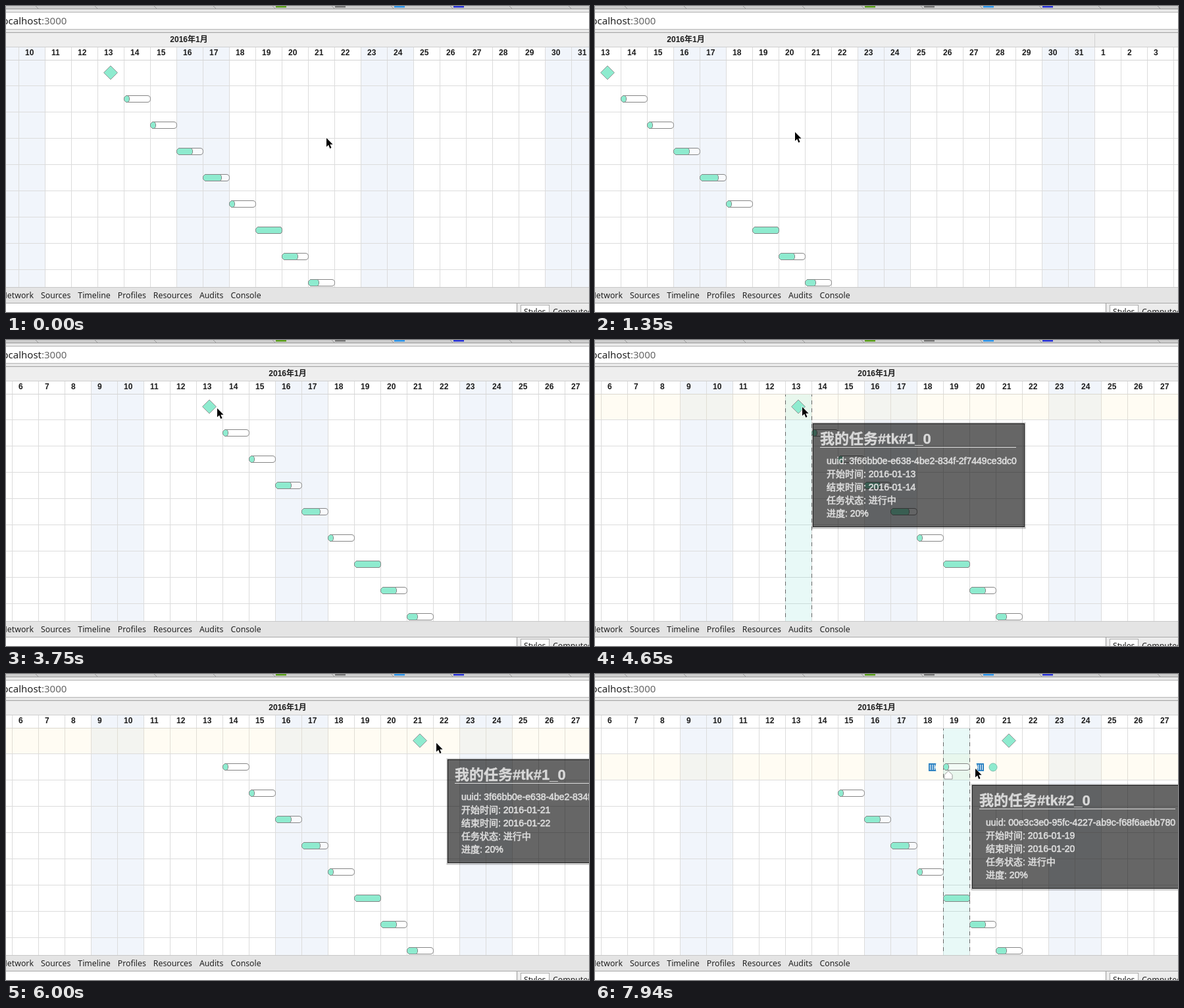
Recreate the animation shown at these times as an HTML page. Size 886 by 466 pixels, loop 8 s.

```html
<!DOCTYPE html>
<html lang="zh">
<head>
<meta charset="utf-8">
<title>Gantt chart</title>
<style>
  html, body { margin: 0; width: 100%; height: 100%; overflow: hidden; background: #fff; }
  svg { display: block; width: 886px; height: 466px; }
  text { font-family: "Liberation Sans", "Noto Sans CJK SC", "Noto Sans CJK JP", "Noto Sans CJK", sans-serif; white-space: pre; }
  .ui { font-family: "Noto Sans", "Open Sans", sans-serif; font-size: 12.3px; fill: #222; }
  .url { font-size: 15px; }
  .port { fill: #666; }
  .head { font-size: 12px; font-weight: bold; fill: #1c1c1c; }
  .tip { font-size: 14px; fill: #ddd; stroke: #ddd; stroke-width: .6px; }
  .title { font-size: 22px; font-weight: bold; fill: #d8d8d8; stroke: #d8d8d8; stroke-width: .4px; }
</style>
</head>
<body>
<svg viewBox="0 0 886 466">
  <g id="chart"></g>
  <g id="chrome"></g>
  <g id="overlay"></g>
</svg>
<script>
const LOOP = 8000, DAY = 40, LAG = 60;
const MINT = '#8eebcf', LINE = '#dcdcdc', EDGE = '#858585';
const PROGRESS = [.2, .2, .6, .7, .2, 1, .6, .4];

// Turning points of the mouse: time, x, y. Everything that is dragged follows it.
const MOUSE = [
  [0, 486, 200], [150, 454, 198],
  [680, 614, 195], [1390, 300, 191], [2090, 696, 187], [2190, 654, 187], [2400, 654, 188], [2700, 602, 188],
  [2850, 602, 188], [3840, 313, 101],
  [4640, 313, 101], [5010, 653, 100], [5190, 653, 104],
  [6000, 653, 104], [6740, 352, 143],
  [7340, 352, 143], [8080, 600, 143]];

function mouse(t) {
  const i = MOUSE.findIndex(k => k[0] > t);
  const [t0, x0, y0] = MOUSE[i - 1], [t1, x1, y1] = MOUSE[i];
  const u = (t - t0) / (t1 - t0), ease = u * u * (3 - 2 * u);
  return { x: Math.round(x0 + (x1 - x0) * ease), y: Math.round(y0 + (y1 - y0) * ease) };
}

// Mouse position as a drag lasting from start to end sees it, a little late
const dragged = (t, start, end) => mouse(Math.min(Math.max(t - LAG, start), end));

const rect = (x, y, w, h, fill, extra = '') => `<rect x="${x}" y="${y}" width="${w}" height="${h}" fill="${fill}" ${extra}/>`;
const path = (d, fill, stroke = 'none', extra = '') => `<path d="${d}" fill="${fill}" stroke="${stroke}" ${extra}/>`;
const text = (x, y, s, cls, extra = '') => `<text x="${x}" y="${y}" class="${cls}" ${extra}>${s}</text>`;
const at = (x, y, s) => `<g transform="translate(${x} ${y})">${s}</g>`;

function bar(x, y, progress) {
  const w = DAY * progress;
  return at(x + .5, y - 4.5,
    path('M3 0H35.5Q40 0 40 5T35.5 10H3L0 7V3Z', 'rgba(255,255,255,.45)', EDGE) +
    path(`M3 0H${w - 2}L${w} 3V7L${w - 2} 10H3L0 7V3Z`, MINT, EDGE));
}

function handles(x, y) {
  const grip = path('M0 0H11.5L9.5 6 11.5 12H0Z', '#2f83c2') + path('M2.5 2V10M5.5 2V10M8.5 2V10', 'none', '#fff');
  return at(x - 22, y - 5, grip) +
    at(x + 62, y - 5, `<g transform="scale(-1 1)">${grip}</g>`) +
    `<circle cx="${x + 76}" cy="${y + 1}" r="6" fill="${MINT}" stroke="#7bbfae"/>` +
    path(`M${x + 8} ${y + 6.5}l6 6v6.5h-12v-6.5Z`, '#fff', '#999');
}

function dayBand(x) {
  return rect(x, 83, DAY, 345, '#7edcd0', 'fill-opacity=".18"') +
    path(`M${x + .5} 83V428M${x + DAY + .5} 83V428`, 'none', '#666', 'stroke-dasharray="6" stroke-dashoffset="3"');
}

function tooltip(x, y, task, uuid, day) {
  const rows = [`uuid: ${uuid}`, `开始时间: 2016-01-${day}`, `结束时间: 2016-01-${day + 1}`, '任务状态: 进行中', '进度: 20%'];
  return at(x, y,
    rect(-.5, -.5, 323, 160, 'none', 'stroke="#000" stroke-opacity=".25" stroke-width="2"') +
    rect(.5, .5, 321, 157, 'rgba(0,0,0,.6)', 'stroke="#1c1c1c"') +
    text(11, 31, `我的任务#tk#${task}_0`, 'title') +
    rect(11, 36, 298, 1, '#ddd') +
    rows.map((s, i) => text(21, 62 + 20 * i, s, 'tip')).join(''));
}

// x0 is the left edge of 14 January
function chart(x0, milestoneDay, barDay, activeRow, bandDay, selected) {
  const column = day => x0 + (day - 14) * DAY;
  let s = rect(0, 41, 886, 21, '#eee') + rect(0, 62, 886, 367, '#fff');
  for (let d = 1; d < 40; d++) {
    const weekend = d % 7 === 2 || d % 7 === 3;
    s += rect(column(d), 63, DAY, 366, weekend ? '#f1f5fb' : '#fff') +
      rect(column(d), 63, 1, 366, LINE) +
      text(column(d) + 10, 75, d > 31 ? d - 31 : d, 'head');
  }
  s += rect(column(32), 42, 1, 20, '#d0d0d0') +
    text(x0 + 99, 55, '2016年1月', 'head', 'text-anchor="middle"') +
    rect(0, 62, 886, 1, '#cfcfcf') + rect(0, 82, 886, 1, '#d4d4d4');
  for (let y = 121; y < 428; y += DAY) s += rect(0, y, 886, 1, LINE);
  if (activeRow >= 0) s += rect(0, 82 + activeRow * DAY, 886, 39, 'rgba(255,235,175,.15)');
  if (bandDay) s += dayBand(column(bandDay));
  s += path(`M${column(milestoneDay) + 20} 91l10.5 10.5-10.5 10.5-10.5-10.5Z`, MINT, '#969696');
  PROGRESS.forEach((p, i) => s += bar(column(i ? 14 + i : barDay), 141 + i * DAY, p));
  if (selected) s += handles(column(barDay), 141);
  return s;
}

function browser() {
  const icons = ['#5c9f1c', '#777', '#2f96ea', '#2b35d8'];
  const tabs = ['Sources', 'Timeline', 'Profiles', 'Resources', 'Audits', 'Console'];
  let s = rect(0, 0, 886, 4, '#cdcdcd') + rect(0, 4, 886, 1, '#9b9b9b') + rect(0, 5, 886, 36, '#e9e9e9');
  for (let x = 45; x < 886; x += 90) s += path(`M${x} 0l4 4`, 'none', '#999');
  icons.forEach((color, i) => s += rect(410 + i * 90, 0, 16, 2.5, color));
  s += rect(0, 9, 886, 27, '#b5b5b5') + rect(0, 10, 886, 25, '#fff') + rect(0, 40, 886, 1, '#a2a2a2') +
    text(54, 28, 'localhost', 'ui url', 'text-anchor="end"') +
    text(54, 28, ':3000', 'ui url port');

  s += rect(0, 428, 886, 25, '#e4e4e4') + rect(0, 428, 886, 1, '#c8c8c8') + rect(0, 452, 886, 1, '#a8a8a8') +
    rect(0, 453, 886, 13, '#fff') +
    text(42, 445, 'Network', 'ui', 'text-anchor="end"') +
    text(42, 445, tabs.map(name => `<tspan dx="11">${name}</tspan>`).join(''), 'ui');
  return s + rect(776, 453, 110, 13, '#ececec') + rect(776, 453, 1, 13, '#999') +
    rect(782.5, 455.5, 43, 20, '#fff', 'stroke="#aaa"') +
    text(787, 470, 'Styles', 'ui') + text(831, 470, 'Computed', 'ui');
}

const cursor = path('M1 1V14.5L4.1 11.6 6.3 17 8.5 16.1 6.3 10.8H10.6Z', '#000', '#fff', 'stroke-width="1.2" paint-order="stroke"');
const layer = (id, content) => document.getElementById(id).innerHTML = content;

function render(t) {
  const pan = dragged(t, 150, 2640), first = dragged(t, 4500, 5940), second = dragged(t, 7340, LOOP);
  const x0 = 179 + 10 * Math.round((pan.x - 454) / 10);
  const milestoneDay = 13 + Math.floor((first.x - 313) / DAY);
  const barDay = 14 + Math.floor((second.x - 352) / DAY);
  const onBar = t >= 7040, onMilestone = t >= 4050 && !onBar;
  const bandDay = onBar ? barDay : onMilestone && t < 6000 ? milestoneDay : 0;

  layer('chart', chart(x0, milestoneDay, barDay, onBar ? 1 : onMilestone ? 0 : -1, bandDay, onBar));
  let top = '';
  if (t >= 7490) top = tooltip(second.x + 18, second.y + 26, 2, '00e3c3e0-95fc-4227-ab9c-f68f6aebb780', barDay);
  else if (t >= 4650) top = tooltip(first.x + 18, first.y + 26, 1, '3f66bb0e-e638-4be2-834f-2f7449ce3dc0', milestoneDay);
  const { x, y } = mouse(t);
  layer('overlay', top + at(x, y, cursor));
}

// The screen updates in 150 ms steps, with one shorter step before 6740 ms
function held(t) {
  const start = t < 6740 ? 0 : 6740;
  return start + Math.floor((t - start) / 150) * 150;
}

layer('chrome', browser());
let shown = -1;
const origin = performance.now();
function tick() {
  const t = held((performance.now() - origin) % LOOP);
  if (t !== shown) render(shown = t);
  requestAnimationFrame(tick);
}
tick();
</script>
</body>
</html>
```
